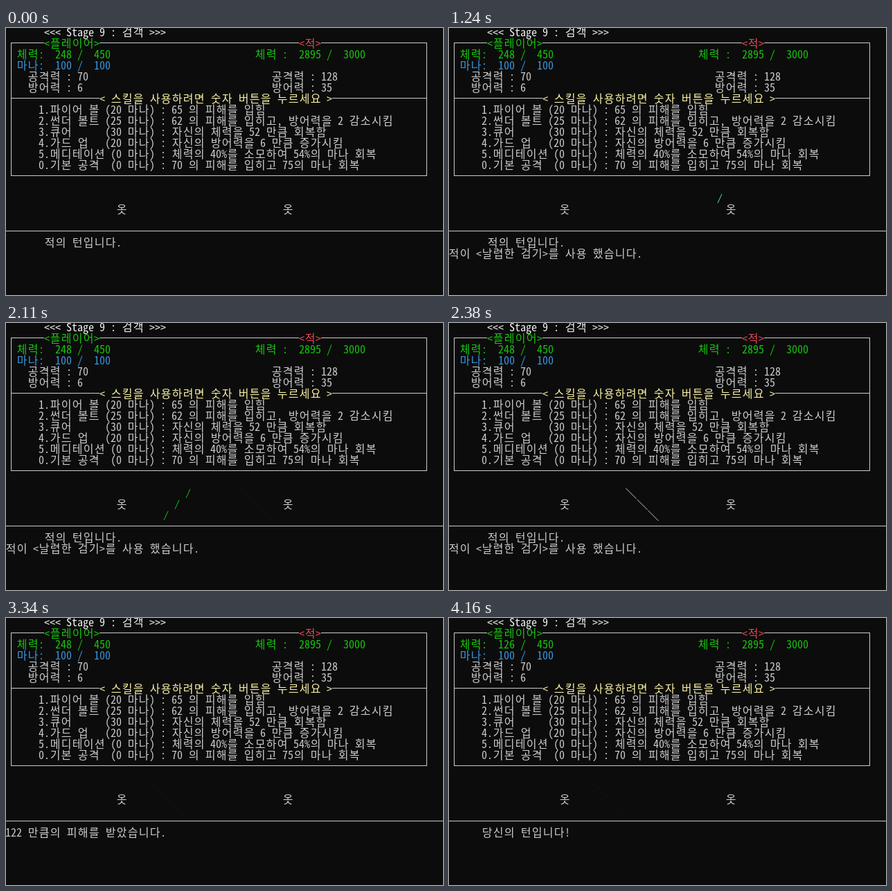
These frames come from a looping animation (631x386 px, 4.71 s). An HTML page with a canvas:

```html
<!DOCTYPE html>
<html lang="ko">
<head>
<meta charset="utf-8">
<title>Stage 9</title>
<style>
html, body { margin: 0; width: 631px; height: 386px; overflow: hidden; background: #0c0c0c; }
canvas { display: block; }
</style>
</head>
<body>
<canvas id="stage" width="631" height="386"></canvas>
<script>
const ctx = document.getElementById('stage').getContext('2d');
const LOOP = 4710, CELL = 8, ROW = 16, LEFT = -1;
const BG = '#0c0c0c', GRAY = '#cccccc', WHITE = '#f2f2f2', GREEN = '#16c60c',
      RED = '#e74856', BLUE = '#3a96dd', CYAN = '#61d6d6', YELLOW = '#f9f1a5', TRACE = '#151515';
const NARROW = '16px "Noto Sans Mono CJK KR", "Noto Sans Mono", monospace';
const WIDE = '300 16px "Noto Sans CJK KR", "Noto Sans Mono CJK KR", "Noto Sans CJK", sans-serif';

const SKILLS = [
  '1.파이어 볼 (20 마나) : 65 의 피해를 입힘',
  '2.썬더 볼트 (25 마나) : 62 의 피해를 입히고, 방어력을 2 감소시킴',
  '3.큐어      (30 마나) : 자신의 체력을 52 만큼 회복함',
  '4.가드 업   (20 마나) : 자신의 방어력을 6 만큼 증가시킴',
  '5.메디테이션 (0 마나) : 체력의 40%를 소모하여 54%의 마나 회복',
  '0.기본 공격  (0 마나) : 70 의 피해를 입히고 75의 마나 회복'
];

// Sword waves: start, end, time per step, top x, direction of the stroke
const WAVES = [
  { from: 1240, to: 1615, step: 30, x: 387, dir: -1, color: CYAN },
  { from: 1615, to: 1930, step: 24.2, x: 351, dir: 1, color: GRAY },
  { from: 1915, to: 2230, step: 24.2, x: 387, dir: -1, color: GREEN },
  { from: 2230, to: 2545, step: 24.2, x: 351, dir: 1, color: GRAY }
];

// Console text: Hangul takes two cells, everything else one
function print(col, row, text, color = GRAY) {
  let x = LEFT + col * CELL;
  ctx.fillStyle = color;
  ctx.textAlign = 'center';
  for (const ch of text) {
    const wide = ch >= '가' && ch <= '힣';
    const w = wide ? CELL * 2 : CELL;
    ctx.font = wide ? WIDE : NARROW;
    if (ch !== ' ') ctx.fillText(ch, x + w / 2, row * ROW + 12);
    x += w;
  }
}

function hline(x0, x1, y) {
  ctx.fillStyle = GRAY;
  ctx.fillRect(x0, y, x1 - x0, 1);
}

function drawFrame() {
  hline(7, 55, 21);
  hline(135, 423, 21);
  hline(455, 608, 21);
  hline(7, 135, 101);
  hline(471, 608, 101);
  hline(7, 608, 213);
  hline(0, 631, 293);
  ctx.fillRect(7, 21, 1, 193);
  ctx.fillRect(607, 21, 1, 193);
}

function drawStatus(hp) {
  print(7, 0, '<<< Stage 9 : 검객 >>>', WHITE);
  print(7, 1, '<플레이어>', GREEN);
  print(53, 1, '<적>', RED);
  print(2, 2, `체력:  ${hp} /  450`, GREEN);
  print(45, 2, '체력 :  2895 /  3000', GREEN);
  print(2, 3, '마나:  100 /  100', BLUE);
  print(4, 4, '공격력 : 70');
  print(48, 4, '공격력 : 128');
  print(4, 5, '방어력 : 6');
  print(48, 5, '방어력 : 35');
  print(17, 6, '< 스킬을 사용하려면 숫자 버튼을 누르세요 >', YELLOW);
  SKILLS.forEach((s, i) => print(6, 7 + i, s));
  print(20, 16, '옷');
  print(50, 16, '옷');
}

function drawMessage(t) {
  if (t < 2560) {
    print(7, 19, '적의 턴입니다.');
    if (t >= 450) print(0, 20, '적이 <날렵한 검기>를 사용 했습니다.');
  } else if (t >= 3340 && t < 4140) {
    print(0, 19, '122 만큼의 피해를 받았습니다.');
  } else if (t >= 4160) {
    print(6, 19, '당신의 턴입니다!');
  }
}

// Three strokes, one per row, each shifted by a wide cell
function strokes(x, dir, color, rows = 3) {
  ctx.strokeStyle = color;
  ctx.lineWidth = 1;
  ctx.beginPath();
  for (let i = 0; i < rows; i++) {
    const cx = x + i * 16 * dir, y = 239 + i * ROW;
    if (dir > 0) {
      ctx.moveTo(cx + 0.5, y);
      ctx.lineTo(cx + 15.5, y + 15);
    } else {
      ctx.moveTo(cx + 7, y + 1);
      ctx.lineTo(cx + 1, y + 14);
    }
  }
  ctx.stroke();
}

function drawWaves(t) {
  const [, second, , last] = WAVES;
  if (t >= second.from + 2 * second.step && t < last.from + 2 * last.step) strokes(336, 1, TRACE);
  if (t >= last.from + 10 * last.step) strokes(208, 1, TRACE);
  const w = WAVES.find(v => t >= v.from && t < v.to);
  if (!w) return;
  const n = Math.min(12, Math.floor((t - w.from) / w.step));
  strokes(w.x - n * 16, w.dir, w.color, w === WAVES[0] && n === 0 ? 1 : 3);
}

function draw(t) {
  ctx.fillStyle = BG;
  ctx.fillRect(0, 0, 631, 386);
  drawWaves(t);
  if (t >= 4140 && t < 4160) return; // screen clears before the redraw
  drawFrame();
  drawStatus(t < 4160 ? 248 : 126);
  drawMessage(t);
}

const start = performance.now();
function tick() {
  draw((performance.now() - start) % LOOP);
  requestAnimationFrame(tick);
}
tick();
</script>
</body>
</html>
```
